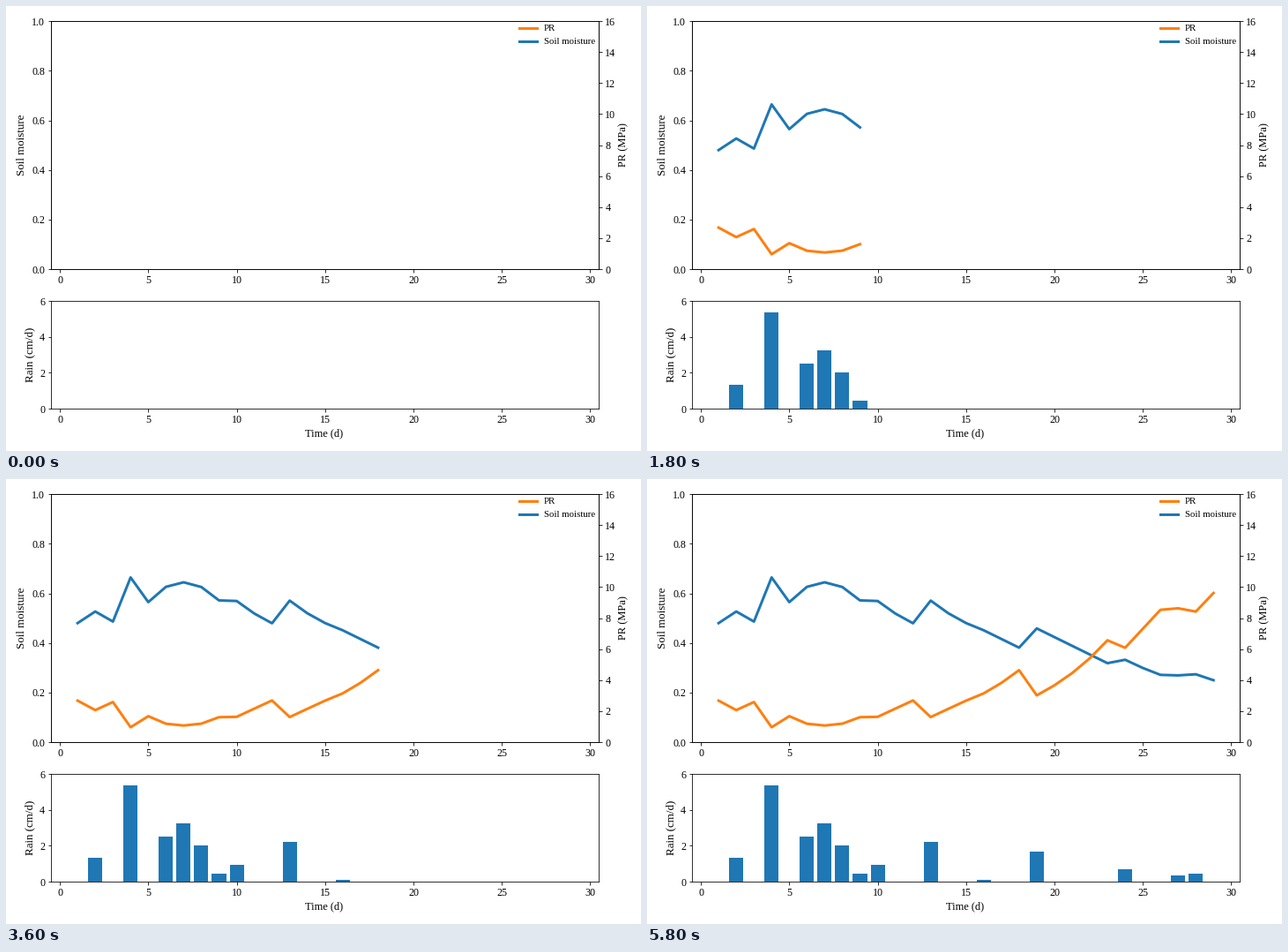
A matplotlib script for the animation above (6 s loop, 720 by 504 pixels).

```python
import numpy as np
import matplotlib.pyplot as plt
from matplotlib.animation import FuncAnimation
from matplotlib.lines import Line2D

W, H, DPI = 720, 504, 72
DAYS = 30
BLUE, ORANGE = "C0", "C1"

plt.rcParams.update({
    "font.family": "Liberation Serif",
    "font.size": 12,
    "axes.linewidth": 0.8,
    "lines.linewidth": 3,
})

# Rain events in cm, by day; they drive both curves
rain = {2: 1.35, 4: 5.35, 6: 2.5, 7: 3.25, 8: 2, 9: 0.45, 10: 0.95,
        13: 2.2, 16: 0.1, 19: 1.7, 24: 0.7, 27: 0.35, 28: 0.45}
SOIL_DEPTH = 15  # cm of rain that would fill the soil


def loss(s):
    """Daily evaporation plus drainage of wet soil."""
    evaporation = 0.035 * min(1, (s - 0.12) / 0.225)
    drainage = 2.87 * max(0, s - 0.445) ** 2.5
    return evaporation + drainage


def simulate(s):
    values = [s]
    for day in range(2, DAYS):
        wet = s + rain.get(day, 0) / SOIL_DEPTH
        s = wet - (loss(s) + loss(wet)) / 2
        values.append(s)
    return np.array(values)


days = np.arange(1, DAYS)
moisture = simulate(0.48)
resistance = 38.5 * np.exp(-5.55 * moisture)

fig = plt.figure(figsize=(W / DPI, H / DPI), dpi=DPI)


def add_axes(top, bottom, ymax, ticks):
    left, right = 51.1, 672.4
    ax = fig.add_axes([left / W, 1 - bottom / H,
                       (right - left) / W, (bottom - top) / H])
    ax.set(xlim=(-0.5, 30.5), ylim=(0, ymax),
           xticks=range(0, 31, 5), yticks=ticks)
    return ax


def label(x, y, text, size=13, **kw):
    fig.text(x / W, 1 - y / H, text, size=size, va="baseline",
             rotation_mode="anchor", **kw)


def legend_row(y, color, text):
    fig.add_artist(Line2D([582 / W, 602 / W], [1 - y / H] * 2, color=color))
    label(610, y + 2.6, text, size=10.8)


soil_ax = add_axes(17.1, 298.1, 1, np.linspace(0, 1, 6))
pr_ax = soil_ax.twinx()
pr_ax.set(ylim=(0, 16), yticks=range(0, 17, 2))
rain_ax = add_axes(334.1, 456.1, 6, range(0, 7, 2))

label(21, 157, "Soil moisture", rotation=90, ha="center")
label(703, 157.5, "PR (MPa)", size=12.5, rotation=90, ha="center")
label(30.5, 395, "Rain (cm/d)", rotation=90, ha="center")
label(361, 487, "Time (d)", size=12.5, ha="center")
legend_row(25.2, ORANGE, "PR")
legend_row(40.2, BLUE, "Soil moisture")

soil_line, = soil_ax.plot([], [], color=BLUE)
pr_line, = pr_ax.plot([], [], color=ORANGE)
bars = rain_ax.bar(list(rain), list(rain.values()), width=0.8, color=BLUE)
rain_ax.set_ylim(0, 6)


def update(day):
    soil_line.set_data(days[:day], moisture[:day])
    pr_line.set_data(days[:day], resistance[:day])
    for bar, start in zip(bars, rain):
        bar.set_visible(start <= day)
    return [soil_line, pr_line, *bars]


anim = FuncAnimation(fig, update, frames=DAYS, interval=200,
                     init_func=lambda: update(0), repeat=True,
                     repeat_delay=0, blit=False)
plt.show()
```
